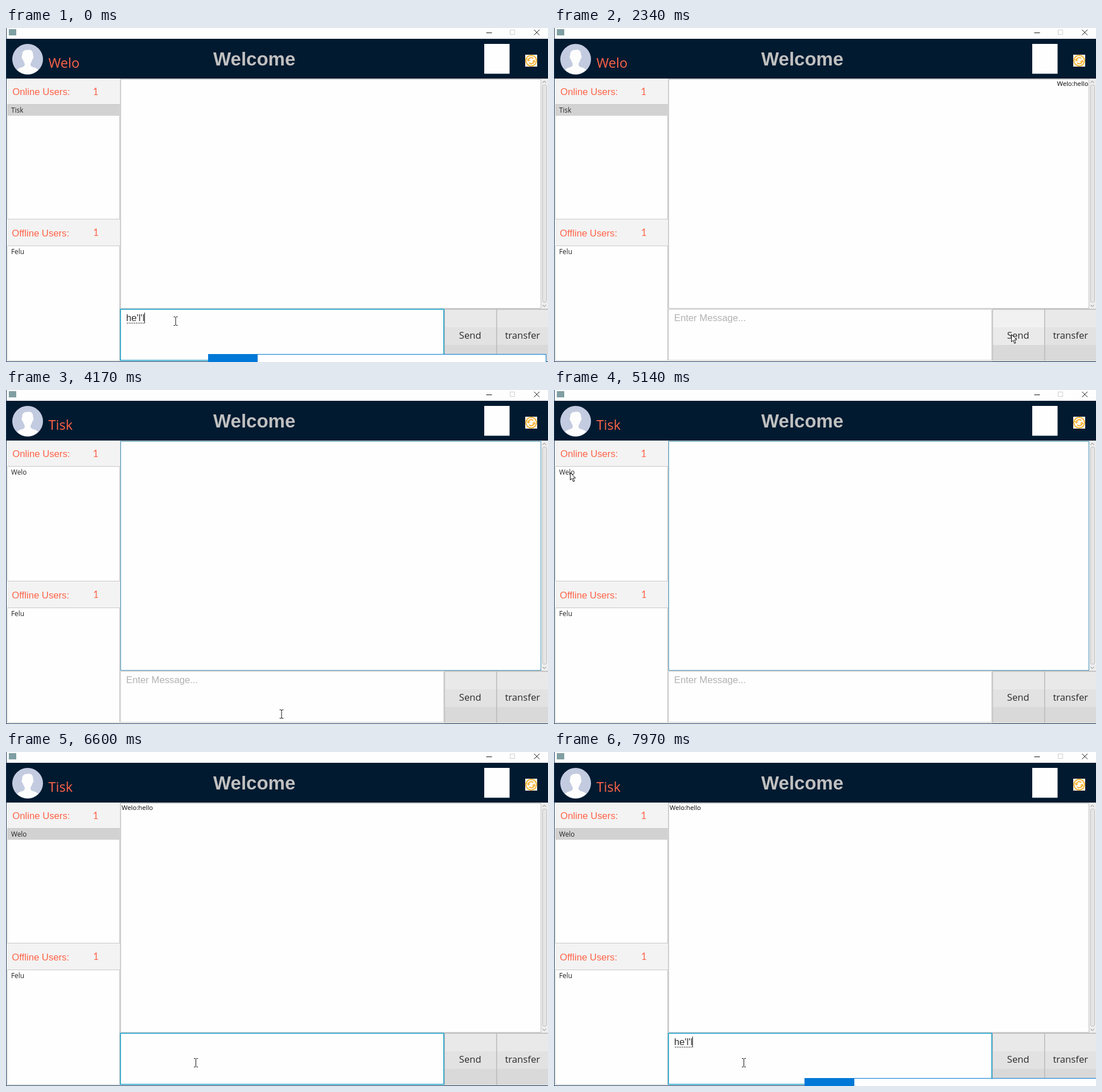
Animation of 952 by 588 pixels, one loop 8000 ms. Source, as an HTML page:

```html
<!DOCTYPE html>
<html lang="en">
<head>
<meta charset="utf-8">
<title>Chat window</title>
<style>
  html, body { margin: 0; width: 100%; height: 100%; overflow: hidden; background: #fff; }
  svg { display: block; --paper: #fefefe; }
  text { white-space: pre; }
  .paper { fill: var(--paper); }
  .arial { font-family: "Liberation Sans", Arial, sans-serif; font-size: 16.7px; }
  .ui { font-family: "Open Sans", "Noto Sans", sans-serif; font-size: 11.8px; fill: #222; }
  .big { font-size: 23.5px; fill: #ff6347; }
  .btn { font-size: 16.7px; fill: #2b2b2b; text-anchor: middle; }
  .red { fill: #ff6347; }
  .one { font: 17px Lato, sans-serif; fill: #ff6347; }
  .list { fill: var(--paper); stroke: #c8c8c8; }
  .line { fill: none; stroke-width: 1; }
</style>
</head>
<body>
<svg id="stage" width="952" height="588" viewBox="0 0 952 588">
  <rect width="952" height="588" fill="#17365c"/>
  <rect class="paper" x="1" width="951" height="587"/>

  <!-- title bar -->
  <rect x="5" y="2" width="13" height="11" fill="#7f9fa3"/>
  <g id="winBtns" class="line" stroke="#111">
    <path d="M843.5 8.5h10M927.5 3l9.5 9.5M937 3l-9.5 9.5"/>
  </g>
  <rect class="line" x="885.5" y="3.5" width="8" height="8" stroke="#d0d0d0"/>

  <!-- header -->
  <rect x="1" y="19" width="951" height="70" fill="#011a30"/>
  <clipPath id="face"><circle cx="38" cy="55" r="26.5"/></clipPath>
  <circle cx="38" cy="55" r="27" fill="#c3cbe0"/>
  <path clip-path="url(#face)" fill="#fdfdfd" d="M38 38.5C44 37 48 41 47.5 48
    C49 49 48.500 54 46.500 55C45.500 59 43.500 61 43 63.500C43 68 46 68.500 51 70
    C56 71.500 58 75 59 83H17C18 75 20 71.500 25 70C30 68.500 33 68 33 63.500
    C32.500 61 30.500 59 29.500 55C27.500 54 27 49 28.500 48C28 42 31 38.500 38 38.500Z"/>
  <text id="owner" class="ui big" x="74.500" y="69.500"></text>
  <text class="arial" x="364" y="66" style="font-size:33px;font-weight:bold" fill="#c0c0c0">Welcome</text>
  <rect x="840" y="28" width="44.500" height="52.500" fill="#fefefe"/>
  <rect x="912" y="47" width="21" height="21" fill="#fff8ea"/>
  <g fill="none" stroke="#f7a81b" stroke-width="1.700">
    <circle cx="922.500" cy="57.500" r="9.300"/>
    <path d="M917.300 56.500A5.200 5.200 0 0 1 926 53.700M927.700 58.500A5.200 5.200 0 0 1 919 61.300"/>
    <path d="M915.500 55l1.800 3 2.800-2M929.500 60l-1.800-3-2.800 2" stroke-width="1.400"/>
  </g>

  <!-- side lists -->
  <rect x="2" y="89" width="198" height="46" fill="#f3f3f3"/>
  <rect x="2" y="337" width="198" height="47" fill="#f3f3f3"/>
  <rect class="list" x="2.500" y="134.500" width="197" height="202"/>
  <rect class="list" x="2.500" y="383.500" width="197" height="202"/>
  <rect id="picked" x="3" y="135" width="197" height="19.500" fill="#d2d2d2"/>
  <text class="arial red" x="11.300" y="118">Online Users:</text>
  <text class="one" x="152.500" y="118">1</text>
  <text class="arial red" x="10.300" y="367">Offline Users:</text>
  <text class="one" x="153" y="366">1</text>
  <text id="peer" class="ui" x="9" y="149.300"></text>
  <text id="away" class="ui" x="9" y="398.300"></text>

  <!-- chat -->
  <rect x="200" y="89" width="752" height="405.500" fill="#d8d8d8"/>
  <rect class="paper" x="202" y="91" width="738" height="402"/>
  <rect id="chatEdge" class="line" x="201.500" y="90.500" width="738" height="403"/>
  <rect x="940" y="90" width="12" height="404" fill="#ededed"/>
  <rect x="942.500" y="100.500" width="7" height="382" rx="2" fill="#e6e6e6" stroke="#bdbdbd"/>
  <path class="line" d="M942.500 96.500l3-3 3 3M942.500 487.500l3 3 3-3" stroke="#777"/>
  <text id="msg" class="ui" y="102.300" style="font-size:11.300px;fill:#000"></text>

  <!-- input -->
  <rect class="paper" x="200" y="494" width="570" height="92"/>
  <rect id="inEdge" x="201" y="495.200" width="568" height="90" fill="none"/>
  <text id="typed" class="arial" x="211" y="515.800"></text>
  <path id="dash" class="line" stroke="#444" stroke-dasharray="3 1"/>
  <path id="caret" class="line" stroke="#222"/>

  <!-- buttons -->
  <g id="buttons"></g>
  <text class="ui btn" x="815.300" y="546.700">Send</text>
  <text class="ui btn" x="907.300" y="546.700">transfer</text>

  <!-- candidate bar -->
  <g id="bar">
    <rect id="barBox" y="574.500" height="20" fill="#fff" stroke="#0078d7"/>
    <rect id="barPick" y="574" height="14" fill="#0078d7"/>
  </g>

  <g id="beam" class="line" stroke="#111">
    <path d="M-3.500 -7.500h2.500l1 1 1-1h2.500M0 -6.500v13M-3.500 7.500h2.500l1-1 1 1h2.500"/>
  </g>
  <path id="arrow" fill="#fff" stroke="#111" stroke-linejoin="round"
    d="M.5 .5V13.500L3.500 10.700 5.800 16.300 8 15.300 5.700 10H9.800Z"/>
</svg>
<script>
const LOOP = 8000;
const A = "Welo", B = "Tisk", C = "Felu";
const $ = id => document.getElementById(id);
const set = (id, attrs) => {
  for (const k in attrs) $(id).setAttribute(k, attrs[k]);
};
const show = (id, on) => set(id, { visibility: on ? "visible" : "hidden" });
const label = (id, s) => { if ($(id).textContent !== s) $(id).textContent = s; };
const within = (t, a, b) => t >= a && t < b;
const at = (track, t) => track.filter(k => k[0] <= t).pop();

// time, x, y, pointer kind
const mouse = [
  [0, 298, 516, "beam"], [1260, 391.5, 532.5, "beam"], [1390, 529, 537, "beam"],
  [1530, 690, 541, "beam"], [1660, 797, 539, "arrow"], [1940, 802, 539, "arrow"],
  [2340, 803, 539, "arrow"], [2490, 704, 553, "beam"], [2610, 0, 0, ""],
  [4040, 494, 572, "beam"], [4170, 484, 570.5, "beam"], [4320, 417, 558, "beam"],
  [4470, 290, 400, "arrow"], [4600, 160, 209, "arrow"], [4740, 60, 170, "arrow"],
  [4860, 37, 158, "arrow"], [5010, 30, 148, "arrow"], [5140, 28, 145, "arrow"],
  [5570, 172, 296, "arrow"], [5690, 395, 576, "beam"], [5840, 372, 572, "beam"],
  [5960, 356, 558, "beam"], [6080, 344.5, 548, "beam"], [6200, 338, 547, "beam"],
  [6320, 333.5, 547, "beam"]
];

// time, text, composing
const typing = [
  [0, "he'l'l", 1], [150, "hello", 1], [550, "hello", 0], [2090, "", 0],
  [7340, "h", 1], [7460, "he", 1], [7600, "he'l", 1], [7720, "he'l'l", 1]
];

// time, left, end of highlight, right edge
const bars = [
  [0, 355, 442, 949], [150, 355, 520, 949], [550, 0, 0, 0],
  [7340, 557, 604, 949], [7460, 557, 613.5, 949], [7600, 440, 508, 949],
  [7720, 355, 442, 949], [7970, 440, 527.5, 960]
];

const em = { h: .556, e: .556, l: .222, o: .556, "'": .191 };
const width = s => [...s].reduce((w, c) => w + em[c] * 16.7, 0);

function button(x, id) {
  const band = (y, h, fill, n) =>
    `<rect id="${id}${n}" x="${x + 1}" y="${y}" width="90" height="${h}" fill="${fill}"/>`;
  return `<rect x="${x}" y="494.500" width="92" height="92" fill="#b9b9b9"/>` +
    band(496, 31, "#e9e9e9", 0) + band(527, 31, "#e2e2e2", 1) + band(558, 28, "#d9d9d9", 2);
}
$("buttons").innerHTML = button(770, "send") + button(861.5, "move");
label("away", C);

function draw(t) {
  const first = t < 3730;
  const faded = within(t, 3580, 3730);
  const focus = t < 2090 || t >= 6200;
  $("stage").style.setProperty("--paper", faded ? "#fcfcfc" : "#fefefe");
  set("winBtns", { stroke: faded ? "#999" : "#111" });

  label("owner", first ? A : B);
  label("peer", first ? B : A);
  show("picked", first || t >= 5290);

  const sent = within(t, 2090, 3730) || t >= 5290;
  label("msg", sent ? A + ":hello" : "");
  set("msg", { x: first ? 938.5 : 203, "text-anchor": first ? "end" : "start" });
  set("chatEdge", { stroke: within(t, 3730, 6200) ? "#4394b8" : "#c4c4c4" });
  set("inEdge", {
    stroke: focus ? "#2ba6ca" : "#c6c6c6",
    "stroke-width": focus ? 1.8 : 1.3
  });

  const [, text, composing] = at(typing, t);
  const end = 211 + width(text);
  label("typed", focus ? text : "Enter Message...");
  set("typed", { fill: focus ? "#333" : "#b2b2b2" });
  set("dash", { d: `M212 519.5H${end - 1}` });
  show("dash", composing);
  const x = Math.floor(end) + .5;
  set("caret", { d: composing ? `M${x} 501V520` : `M${x} 500V520.500` });
  show("caret", focus && !within(t, 1260, 1660) && !within(t, 6600, 7190));

  const hover = within(t, 1660, 2490);
  set("send0", { fill: hover ? "#f1f1f1" : "#e9e9e9" });
  set("send1", { fill: hover ? "#eaeaea" : "#e2e2e2" });

  const [, left, pick, right] = at(bars, t);
  show("bar", right > 0);
  set("barBox", { x: left + .5, width: Math.max(0, right - left - 1) });
  set("barPick", { x: left, width: pick - left });

  const [, mx, my, kind] = at(mouse, t);
  for (const id of ["beam", "arrow"]) {
    show(id, id === kind);
    set(id, { transform: `translate(${mx} ${my})` });
  }
}

const start = performance.now();
function tick() {
  draw((performance.now() - start) % LOOP);
  requestAnimationFrame(tick);
}
tick();
</script>
</body>
</html>
```
